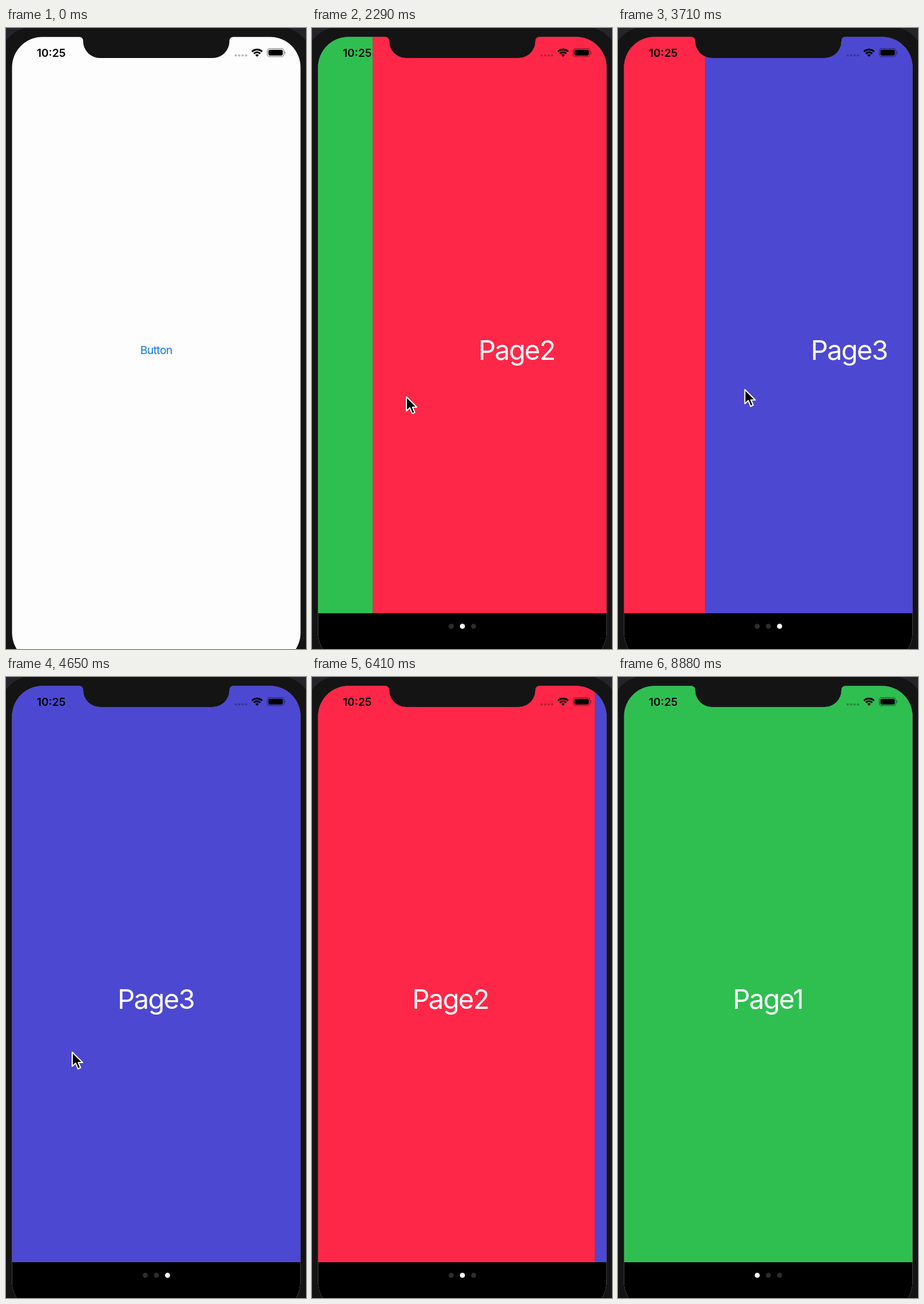
Animation of 521 by 1076 pixels, one loop 8940 ms. Source, as an HTML page:

```html
<!DOCTYPE html>
<html lang="en">
<head>
<meta charset="utf-8">
<title>Paged screens</title>
<style>
  html, body { margin: 0; width: 100%; height: 100%; overflow: hidden; background: #141415; }
  svg { display: block; width: 100%; height: 100%; font-family: Inter, sans-serif; }
  .title { font-size: 47px; letter-spacing: -1.7px; fill: #fff; text-anchor: middle; }
</style>
</head>
<body>
<svg viewBox="0 0 521 1076">
  <defs>
    <clipPath id="screen">
      <path d="M10.5 68A52.5 52.5 0 0 1 63 15.5H127Q134 15.5 134 23A29 29 0 0 0 163 52H359A29 29 0 0 0 388 23Q388 15.5 395 15.5H459A52.5 52.5 0 0 1 511.5 68V1048A52.5 52.5 0 0 1 459 1100.5H63A52.5 52.5 0 0 1 10.5 1048Z"/>
    </clipPath>
  </defs>
  <rect width="521" height="1076" fill="#141415"/>
  <path d="M0 0H32Q12 6 0 22ZM521 0H489Q509 6 521 22Z" fill="#24242a"/>

  <g clip-path="url(#screen)">
    <rect width="521" height="1101" fill="#fdfdfd"/>
    <text x="261" y="565" font-size="19" letter-spacing="-.5" text-anchor="middle" fill="#0b79e3">Button</text>
    <g id="sheet">
      <rect x="10" y="15" width="502" height="1086"/>
      <g id="pages"></g>
      <g id="dots"></g>
    </g>
    <text x="53.5" y="50" font-size="19" font-weight="600">10:25</text>
    <g id="signal" opacity=".26"></g>
    <g fill="none" stroke="#000" stroke-width="3.1">
      <path d="M427.2 41A12.4 12.4 0 0 1 444.8 41"/>
      <path d="M430.5 44.3A7.8 7.8 0 0 1 441.5 44.3"/>
    </g>
    <path d="M436 50L432.9 46.8A4.4 4.4 0 0 1 439.1 46.8Z"/>
    <g opacity=".45">
      <rect x="453.7" y="35.7" width="29" height="14" rx="4.3" fill="none" stroke="#000" stroke-width="1.3"/>
      <path d="M484 40.5Q487 42.7 484 45Z"/>
    </g>
    <rect x="455.7" y="37.7" width="25" height="10" rx="2.6"/>
  </g>

  <path id="cursor" d="M0 2V26.5L6 21L10 31L14.5 29L10.5 20H18Z" stroke="#fff" stroke-width="2" stroke-linejoin="round"/>
</svg>
<script>
const LOOP = 8940, PAGE = 501, SHEET = 1085, GLIDE = 450;
const colors = ['#2fbf51', '#ff2747', '#4d48d1'];
const openAt = 887, swipes = [1950, 3430, 5853, 7039.5];

// Pointer: where it heads and when it sets off
const below = [330, 1090], button = [266, 564], right = [447, 574], left = [115, 648], away = [560, 630];
const route = [
  [openAt - GLIDE, button], [1350, right], [swipes[0], left],
  [2450, right], [swipes[1], left], [swipes[2], away]
];

const $ = id => document.getElementById(id);
const move = (el, x, y) => el.setAttribute('transform', `translate(${x} ${y})`);
const row = (n, x, step, y, r) => Array.from({ length: n }, (_, i) =>
  `<circle cx="${x + i * step}" cy="${y}" r="${r}"/>`).join('');

$('pages').innerHTML = colors.map((c, i) => `<g transform="translate(${i * PAGE} 0)">
  <rect x="10.5" y="15" width="501.3" height="999" fill="${c}"/>
  <text class="title" x="260.3" y="575">Page${i + 1}</text></g>`).join('');
$('dots').innerHTML = row(3, 241.8, 19.4, 1036.7, 4.4);
$('signal').innerHTML = row(4, 399, 6, 47.5, 2.1);
const dots = [...$('dots').children];

// Critically damped spring from 0 to 1
const spring = x => x > 0 ? 1 - (1 + x) * Math.exp(-x) : 0;

const glide = time => {
  const u = Math.min(1, Math.max(0, time / GLIDE));
  return u * u * (3 - 2 * u);
};

const pointer = t => route.reduce((at, [start, goal]) =>
  at.map((v, i) => v + (goal[i] - v) * glide(t - start)), below);

function draw(t) {
  // The first two swipes go forward, the rest go back
  const page = swipes.reduce((p, start, i) =>
    p + (i < 2 ? 1 : -1) * spring((t - start) * .009), 0);
  move($('sheet'), 0, Math.round(SHEET * (1 - spring((t - openAt) * .018))));
  move($('pages'), -Math.round(PAGE * page), 0);
  dots.forEach((d, i) => d.setAttribute('fill', i === Math.round(page) ? '#fff' : '#2d2d2d'));
  move($('cursor'), ...pointer(t));
}

const begin = performance.now();
function tick() {
  draw((performance.now() - begin) % LOOP);
  requestAnimationFrame(tick);
}
tick();
</script>
</body>
</html>
```
